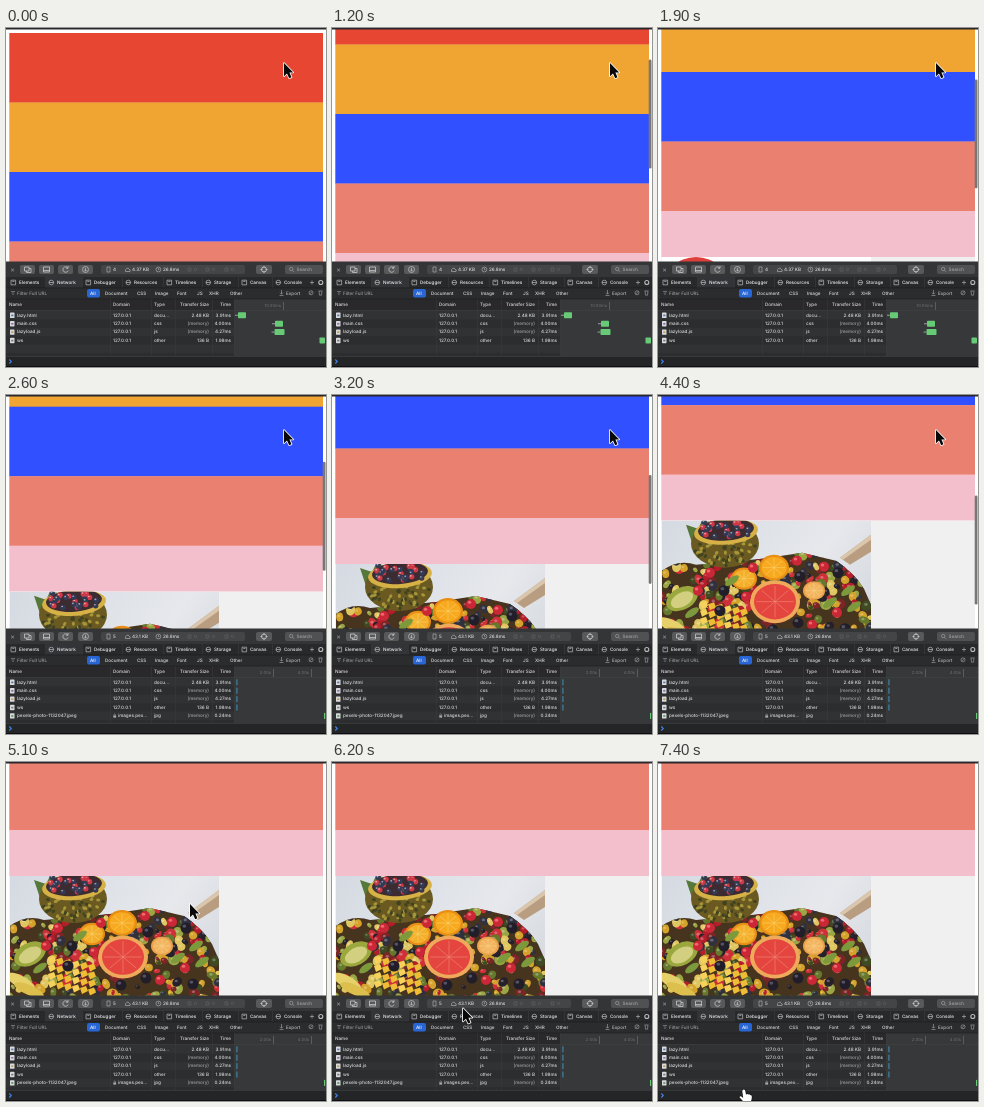
Animation of 320x339 px, one loop 7700 ms. Source, as an HTML page with a canvas:

```html
<!DOCTYPE html>
<html lang="en">
<head>
<meta charset="utf-8">
<title>Lazy loading</title>
<style>
html, body { margin: 0; width: 100%; height: 100%; overflow: hidden; background: #1f1f21; }
canvas { display: block; width: 320px; height: 339px; }
</style>
</head>
<body>
<canvas id="stage" width="320" height="339"></canvas>
<script>
const LOOP = 7700, LOADED = 2200;
const c = document.getElementById('stage').getContext('2d');
c.textRendering = 'geometricPrecision';

const SCROLL = [[100, 0], [1200, 58], [1900, 100], [3200, 160], [3900, 184], [4700, 215]];
const POINTER_X = [[4600, 278], [5100, 184], [5700, 176], [6700, 86]];
const POINTER_Y = [[4600, 35], [5100, 142], [5700, 165], [6700, 327.5]];

// Linear interpolation through [time, value] points
function at(t, points) {
  if (t <= points[0][0]) return points[0][1];
  for (let i = 1; i < points.length; i++) {
    const [t0, a] = points[i - 1], [t1, b] = points[i];
    if (t < t1) return a + (b - a) * (t - t0) / (t1 - t0);
  }
  return points[points.length - 1][1];
}

function rect(x, y, w, h, color) {
  c.fillStyle = color;
  c.fillRect(x, y, w, h);
}

function pill(x, y, w, h, color, r = 2) {
  c.fillStyle = color;
  c.beginPath();
  c.roundRect(x, y, w, h, r);
  c.fill();
}

function oval(x, y, rx, ry, color, turn = 0) {
  c.fillStyle = color;
  c.beginPath();
  c.ellipse(x, y, rx, ry, turn, 0, 7);
  c.fill();
}

function shape(d, color) {
  c.fillStyle = color;
  c.fill(new Path2D(d));
}

function stroke(d, color = '#c8c8ca', width = .8) {
  c.strokeStyle = color;
  c.lineWidth = width;
  c.stroke(new Path2D(d));
}

function text(s, x, y, color = '#dcdcde', align = 'left', weight = 500, size = 4.6) {
  c.font = `${weight} ${size}px Inter, "Liberation Sans", sans-serif`;
  c.textAlign = align;
  c.textBaseline = 'middle';
  c.fillStyle = color;
  c.fillText(s, x, y);
}

function randomizer(seed) {
  return () => (seed = seed * 16807 % 2147483647) / 2147483647;
}

function slice(x, y, r, rim, flesh, ray) {
  oval(x, y, r, r * .86, rim);
  oval(x, y, r * .84, r * .71, flesh);
  for (let a = 0; a < 6.2; a += Math.PI / 4)
    stroke(`M${x} ${y}l${Math.cos(a) * r * .75} ${Math.sin(a) * r * .63}`, ray, .6);
}

function berry(x, y, r, color, shine) {
  oval(x, y, r, r, color);
  oval(x - r * .3, y - r * .35, r * .35, r * .3, shine);
}

function heap(rnd) {
  const outline = new Path2D('M0 50Q16 38 34 44L100 38L140 32L174 40Q192 52 202 68L209 84V140H0Z');
  const colors = ['#b51d2b', '#cf3038', '#26202b', '#31303f', '#d5a32c', '#66782c', '#9aa544', '#e0c660', '#7d2426', '#3f4a22'];
  c.save();
  c.clip(outline);
  rect(0, 0, 209, 140, '#46341f');
  for (let i = 0; i < 330; i++) {
    const x = rnd() * 209, y = 32 + rnd() * 108, r = 2.5 + rnd() * 3.5;
    const color = colors[Math.floor(rnd() * colors.length)];
    oval(x, y, r, r * (.6 + rnd() * .4), color, rnd() * 3);
    oval(x - 1, y - 1, r * .3, r * .25, '#ffffff48');
  }
  c.restore();
}

function bowl(rnd) {
  shape('M30 22L24 4L36 8L40 0L54 2L50 22Z', '#56783a');
  oval(63, 23, 34, 24, '#6a5a22');
  for (let i = 0; i < 90; i++) {
    const a = rnd() * 6.3, d = Math.sqrt(rnd());
    oval(63 + Math.cos(a) * d * 32, 24 + Math.sin(a) * d * 21, 2, 1.5, i % 2 ? '#a6963a' : '#3f4320', a);
  }
  oval(64, 11, 32, 13, '#d6b145', -.08);
  oval(64, 9, 28, 11, '#3c2b30', -.08);
  for (let i = 0; i < 34; i++)
    berry(40 + rnd() * 47, 1 + rnd() * 15, 2.7, i % 3 ? '#333a55' : '#cf3846', '#ffffff90');
}

function photo(x, y) {
  c.save();
  c.translate(x, y);
  c.beginPath();
  c.rect(0, 0, 209, 140);
  c.clip();
  const table = c.createLinearGradient(0, 0, 209, 140);
  table.addColorStop(0, '#d5dae2');
  table.addColorStop(.6, '#e6e8ec');
  table.addColorStop(1, '#cfd3da');
  rect(0, 0, 209, 140, table);
  shape('M178 37L209 14V31L188 44Z', '#b99d80');
  shape('M178 37L209 14V19L181 39Z', '#dac6ad');

  const rnd = randomizer(77);
  heap(rnd);
  bowl(rnd);

  // Larger pieces
  oval(20, 78, 17, 11, '#9aa83e', -.5);
  oval(20, 79, 12, 7, '#d2d080', -.5);
  oval(11, 106, 16, 6, '#e6d06a', .5);
  oval(19, 114, 16, 5, '#dcbf4c', .4);
  for (let i = 0; i < 24; i++)
    shape(`M${38 + i % 6 * 8} ${82 + Math.floor(i / 6) * 8 + i % 6 * 1.5}l6-2 2 5-6 3z`, i % 3 ? '#efbd35' : '#f6d25a');
  slice(82, 58, 13, '#e88d17', '#f3ae2b', '#f9d36a');
  slice(112, 47, 15, '#e98e14', '#f7aa20', '#fbd16a');
  slice(152, 70, 11, '#e9a04b', '#f2b45e', '#f8d28e');
  slice(113, 81, 25, '#efa95a', '#e4453f', '#f08b78');
  for (const [bx, by] of [[48, 52], [91, 47], [135, 40], [162, 46], [36, 70], [84, 76], [175, 92], [150, 104]])
    berry(bx, by, 5, '#cb2736', '#ee6a6d');
  for (const [bx, by] of [[62, 70], [138, 56], [176, 52], [58, 90], [111, 109], [136, 102], [183, 108]])
    berry(bx, by, 5.5, '#211e29', '#555263');
  for (const [lx, ly] of [[186, 70], [168, 82], [192, 86], [70, 60], [30, 92]])
    oval(lx, ly, 8, 3.5, '#7c9a3c', -.6);
  c.restore();
}

function page(t) {
  const s = at(t, SCROLL);
  c.save();
  c.beginPath();
  c.rect(0, 1, 320, 233);
  c.clip();
  rect(0, 0, 320, 240, '#fff');
  ['#e64632', '#f0a432', '#3150ff', '#ea806f'].forEach((color, i) =>
    rect(3.3, 5 + i * 69.5 - s, 313.7, 69.8, color));
  rect(3.3, 283 - s, 313.7, 46, '#f3bfcd');
  const top = 329 - s;
  rect(3.3, top, 313.7, 160, '#f0f0f0');
  if (t < LOADED) {
    rect(4, top, 209, 140, '#fff');
    oval(38, top + 34, 34, 34, '#df3f3a');
  } else photo(4, top);
  if (t >= 100 && t < 5050) {
    c.globalAlpha = at(t, [[4750, 1], [5050, 0]]);
    pill(316.7, 4 + s * .475, 2.8, 109, '#777', 1.4);
  }
  c.restore();
  rect(0, 0, 320, 1.5, '#29262c');
}

function toolbar(loaded) {
  rect(0, 233.5, 320, 15.5, '#343537');
  text('×', 6.5, 241.5, '#999', 'center', 400, 7);
  for (const x of [14, 33, 52, 72]) pill(x, 237, 15, 9, '#58595b');
  stroke('M18.5 239h4.5v4h-4.5zM20.5 243v1.5h4.5v-4h-2M37.5 239h6v5h-6zM37.5 242.5h6');
  stroke('M61.8 240a2.7 2.7 0 1 0 .3 2.6M62 238v2.2h-2');
  stroke('M76.5 241.5a3 3 0 1 0 6 0a3 3 0 1 0-6 0M79.5 239.8v3.2M78.2 241.8l1.3 1.3 1.3-1.3', '#c8c8ca', .7);
  pill(95, 237, 144, 9, '#444547');
  stroke('M101 239h3v5h-3zM119.5 243.5h4.5q1-2-1-2.2q-.5-2-2.3-.9q-1.8 1-1.2 3.1', '#bbb', .6);
  stroke('M150 241.5a2.4 2.4 0 1 0 4.8 0a2.4 2.4 0 1 0-4.8 0M152.4 240v1.7h1', '#bbb', .6);
  text(loaded ? '5' : '4', 107, 241.7);
  text(loaded ? '43.1 KB' : '4.37 KB', 126, 241.7);
  text('26.8ms', 157, 241.7);
  for (const x of [182, 200, 219]) {
    stroke(`M${x} 240h3v3h-3z`, '#646567', .6);
    text('0', x + 6, 241.7, '#646567');
  }
  pill(250, 237, 16, 9, '#58595b');
  stroke('M255.5 241.5a2.5 2.5 0 1 0 5 0a2.5 2.5 0 1 0-5 0M258 238v2M258 243v2M254.5 241.5h2M259.5 241.5h2');
  pill(279, 237, 38, 9, '#505153');
  stroke('M283.5 241a1.7 1.7 0 1 0 3.4 0a1.7 1.7 0 1 0-3.4 0M286.5 242.3l1.6 1.6', '#aaa', .6);
  text('Search', 290.5, 241.7, '#a5a6a8');
}

function tabs() {
  rect(0, 249, 320, 11, '#28292b');
  rect(40, 249, 36, 11, '#333437');
  const names = ['Elements', 'Network', 'Debugger', 'Resources', 'Timelines', 'Storage', 'Canvas', 'Console'];
  const xs = [13, 51, 88, 128, 169, 208, 244, 278];
  names.forEach((name, i) => {
    const x = xs[i] - 8;
    stroke(i % 2 ? `M${x} 254.5a2.3 2.3 0 1 0 4.6 0a2.3 2.3 0 1 0-4.6 0M${x} 254.5h4.6`
                 : `M${x} 252.2h4.6v4.6h-4.6zM${x + 1.3} 253.5h2`, '#bbb', .7);
    text(name, xs[i], 254.6, '#f0f0f1');
    if (i) rect(x - 4, 249, .5, 11, '#424345');
  });
  stroke('M304 254.5h4M306 252.5v4', '#aaa', .7);
  stroke('M312.8 254.5a2 2 0 1 0 4 0a2 2 0 1 0-4 0', '#bbb', 1.1);
}

function filters() {
  rect(0, 260, 320, 11, '#2b2c2e');
  rect(0, 259.6, 320, .7, '#1b1b1d');
  stroke('M5 263.5h4M5.7 265h2.6M6.4 266.5h1.2', '#999', .6);
  text('Filter Full URL', 11, 265.2, '#9a9b9d');
  pill(81, 261, 13, 8.5, '#2865d5');
  const names = ['All', 'Document', 'CSS', 'Image', 'Font', 'JS', 'XHR', 'Other'];
  [84, 99, 131, 149, 171, 191, 203, 224].forEach((x, i) =>
    text(names[i], x, 265.2, i ? '#dcdcde' : '#fff'));
  stroke('M275.5 262v4M274 264.7l1.5 1.5 1.5-1.5M273.5 267.5h4', '#aaa', .6);
  text('Export', 280, 265.2, '#b8b8ba');
  stroke('M303 264.8a2 2 0 1 0 4 0a2 2 0 1 0-4 0M303.6 266.2l2.8-2.8M312.5 263h4M313.1 263.2l.4 4h2l.4-4', '#aaa', .6);
}

const ROWS = [
  ['lazy.html', '127.0.0.1', 'docu…', '2.48 KB', '3.91ms'],
  ['main.css', '127.0.0.1', 'css', '(memory)', '4.00ms'],
  ['lazyload.js', '127.0.0.1', 'js', '(memory)', '4.27ms'],
  ['ws', '127.0.0.1', 'other', '136 B', '1.98ms'],
  ['pexels-photo-1132047.jpeg', 'images.pex…', 'jpg', '(memory)', '0.24ms']
];
const BARS = [[232, 8], [269, 8], [268.5, 10], [313.5, 5.5]];

function table(loaded) {
  rect(0, 271, 320, 68, '#2c2d2f');
  rect(0, 271, 320, 11.5, '#29292b');
  for (let i = 0; i < 6; i += 2) rect(0, 283 + i * 8.4, 320, 8.4, '#313234');
  rect(228, 271, 92, 57, '#37383a');
  rect(0, 270.7, 320, .6, '#1b1b1d');
  rect(0, 282, 320, .6, '#424345');
  for (const x of [104.5, 145.5, 169, 206, 228]) rect(x, 271, .5, 57, '#3c3d3f');
  ['Name', 'Domain', 'Type'].forEach((s, i) => text(s, [3, 107, 148][i], 277));
  text('Transfer Size', 203, 277, '#dcdcde', 'right');
  text('Time', 225, 277, '#dcdcde', 'right');
  const marks = loaded ? [[267, '2.00s'], [305, '4.00s']] : [[277, '10.00ms']];
  for (const [x, label] of marks) {
    text(label, x - 2, 278, '#707174', 'right', 400, 4.2);
    rect(x, 274, .6, 8, '#747578');
  }
  ROWS.slice(0, loaded ? 5 : 4).forEach((row, i) => {
    const y = 287.3 + i * 8.4, remote = i === 4;
    pill(4, y - 2.7, 4.5, 5.4, '#d9dadc', .6);
    rect(5.2, y - .7, 2.2, 1.6, ['#5376bb', '#8b69b0', '#c49b45', '#777', '#56945a'][i]);
    text(row[0], 11, y);
    if (remote) {
      rect(107.3, y - .5, 2.8, 2.2, '#aaa');
      stroke(`M107.9 ${y - .5}v-1q.8-1 1.6 0v1`, '#aaa', .5);
    }
    text(row[1], remote ? 112 : 107, y);
    text(row[2], 148, y);
    text(row[3], 203, y, i % 3 ? '#a0a1a3' : '#dcdcde', 'right');
    text(row[4], 225, y, '#dcdcde', 'right');
    if (loaded) rect(remote ? 318 : 230.3, y - 3, 1.2, 6, remote ? '#67ca76' : '#3e83a3');
    else {
      const [x, w] = BARS[i];
      if (i < 3) rect(x - 3, y - .6, 3, 1.2, '#8b8c8f');
      pill(x, y - 3, w, 6, '#67ca76', .8);
    }
  });
  rect(0, 328, 320, 11, '#242527');
  rect(0, 328, 320, .6, '#444547');
  rect(0, 338, 320, 1, '#0e0d12');
  stroke('M3.3 331.5l2 2-2 2', '#4384f0', 1.1);
}

const ARROW = new Path2D('M0 0V13.2L3 10.5L5.2 15.2L7.5 14.2L5.4 9.5H9.2Z');
const HAND = new Path2D('M1.7 0Q3.2-.2 3.3 1.5L4 5Q5.5 3.8 6.2 5Q7.7 4.3 8.1 5.7Q9.7 5.1 9.8 7.1Q10 10 8.3 13H2.4L-2.4 8Q-2.6 6.3-.6 7L1.2 8.4L.3 2Q.2.2 1.7 0Z');

function pointer(t) {
  const hand = t >= 6600;
  const path = hand ? HAND : ARROW;
  c.save();
  c.translate(at(t, POINTER_X) - (hand ? 2 : 0), at(t, POINTER_Y));
  c.lineJoin = 'round';
  c.lineWidth = hand ? 1.2 : 1.6;
  c.strokeStyle = hand ? '#111' : '#fff';
  c.fillStyle = hand ? '#fff' : '#090909';
  c.stroke(path);
  c.fill(path);
  c.restore();
}

function draw(now) {
  const t = Math.floor(now % LOOP / 100) * 100;
  const loaded = t >= LOADED;
  page(t);
  toolbar(loaded);
  tabs();
  filters();
  table(loaded);
  pointer(t);
  requestAnimationFrame(draw);
}
draw(0);
</script>
</body>
</html>
```
